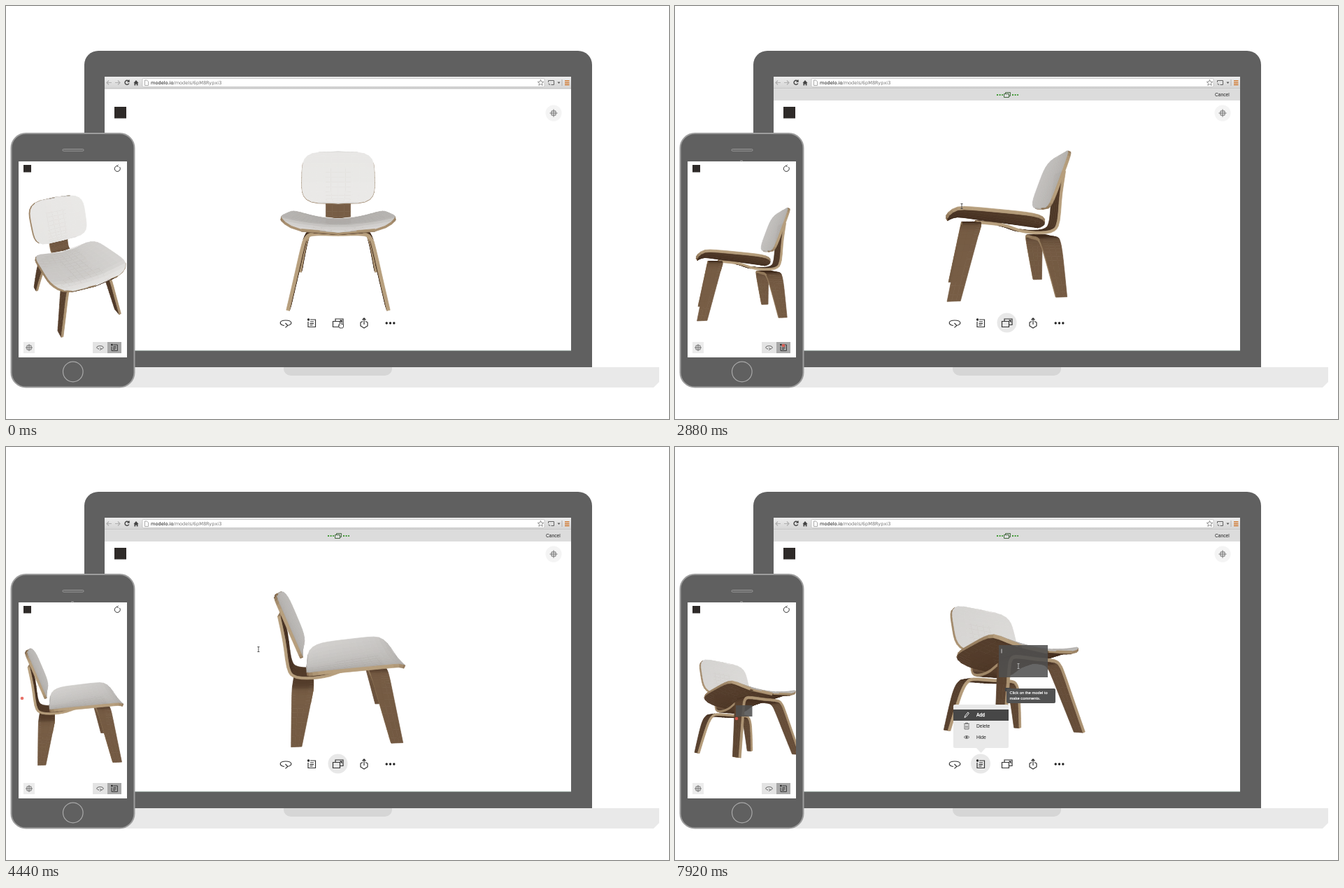
An HTML page with a canvas for the animation above (8 s loop, 948 by 590 pixels).

```html
<!DOCTYPE html>
<html lang="en">
<head>
<meta charset="utf-8">
<title>Chair viewer on laptop and phone</title>
<style>
  html, body { margin: 0; width: 100%; height: 100%; overflow: hidden; background: #fff; }
  svg, canvas { position: absolute; left: 0; top: 0; width: 948px; height: 590px; }
  text { font-family: "Liberation Sans", Arial, sans-serif; font-size: 6.7px; }
  .url { font-family: "DejaVu Sans", sans-serif; font-size: 6.6px; fill: #777; }
  .line { fill: none; stroke: #333; stroke-width: 1.2; }
  .thin { fill: none; stroke: #666; stroke-width: .9; }
</style>
</head>
<body>
<svg viewBox="0 0 948 590">
  <defs>
    <linearGradient id="chrome" x2="0" y2="1">
      <stop stop-color="#ededed"/><stop offset="1" stop-color="#d4d4d4"/>
    </linearGradient>
  </defs>
  <path d="M100 516H934V537L926 545H100Z" fill="#e9e9e9"/>
  <path d="M112 516V84a20 20 0 0 1 20-20H818a20 20 0 0 1 20 20V516Z" fill="#606060"/>
  <path d="M397 516H552V518a10 10 0 0 1-10 10H407a10 10 0 0 1-10-10Z" fill="#d6d6d6"/>
  <path d="M141 101H808V492H141Z" fill="#fff"/>
  <path d="M141 492.3H808" stroke="#b3c4bb" stroke-width=".8"/>
  <path d="M141 101H808V118H141Z" fill="url(#chrome)"/>
  <path d="M141 118H808" stroke="#b4b4b4" stroke-width=".8"/>
  <rect x="195" y="103.500" width="575" height="12" rx="1.500" fill="#fff" stroke="#b9b9b9" stroke-width=".7"/>
  <g fill="none" stroke="#b0b0b0" stroke-width="1.200">
    <path d="M151 109.500h-7m3-3l-3 3l3 3M156 109.500h7m-3-3l3 3l-3 3"/>
    <path d="M175.500 107.500a3 3 0 1 0 .3 3M176 105.500v2.600h-2.600" stroke="#444" stroke-width="1.400"/>
    <path d="M198.500 106h3l2 2v5.500h-5Z" stroke="#888" stroke-width=".7"/>
    <path d="M764.500 105.400l1.200 2.800l3 .2l-2.300 2l.8 3l-2.700-1.700l-2.700 1.700l.8-3l-2.300-2l3-.2Z" stroke="#777" stroke-width=".8"/>
    <path d="M775.500 109v-2.500h8v6h-4M775.500 111a2 2 0 0 1 2 2" stroke="#555" stroke-width=".9"/>
    <path d="M795 105v9" stroke="#999" stroke-width=".7"/>
    <path d="M799 107h6.500m-6.500 2.700h6.500m-6.500 2.700h6.500" stroke="#d0752a" stroke-width="1.500"/>
  </g>
  <path d="M182.500 110l3.500-4l3.500 4h-1v3.500h-1.700v-2h-1.600v2h-1.700v-3.500Z" fill="#444"/>
  <path d="M788.500 108.500h4l-2 2.500Z" fill="#555"/>
  <text class="url" x="207" y="112"><tspan fill="#111">modelo.io</tspan>/models/6pM8Rypxi3</text>
  <rect x="155" y="144" width="17" height="16.500" fill="#2e2a28"/>
  <circle cx="783" cy="153" r="11.500" fill="#f4f4f4"/>
  <path class="thin" d="M777.500 153h11M783 147.500v11M780 150h6v6h-6Z"/>
  <g id="bar">
    <path d="M141 118.500H808V135H141Z" fill="#dcdcdc"/>
    <path d="M460 127h9M482 127h9" stroke="#3f9a34" stroke-width="2" stroke-dasharray="2 1.600"/>
    <path class="thin" d="M470.500 125.500h7v5h-7ZM472.500 125.500v-2h7v5h-2" style="stroke:#355c30"/>
    <text x="772" y="129.200" fill="#222">Cancel</text>
  </g>
  <rect x="7.500" y="182" width="176" height="362.500" rx="21" fill="#606060" stroke="#9d9d9d" stroke-width="2"/>
  <rect x="81" y="204.500" width="30" height="2.600" rx="1.300" fill="none" stroke="#a2a2a2" stroke-width=".9"/>
  <circle cx="95.800" cy="522.500" r="14.300" fill="none" stroke="#aaa" stroke-width="1.200"/>
  <path d="M18 222H173V502H18Z" fill="#fff"/>
  <path id="notch" d="M93 220.500a2 2 0 0 0 4 0Z" fill="#999"/>
</svg>
<canvas id="stage"></canvas>
<svg viewBox="0 0 948 590">
  <rect x="25" y="227" width="11" height="10.500" fill="#2e2a28"/>
  <path class="line" d="M162.500 230a4 4 0 1 1-3-1.600m1.200-1.500l-1.600 1.500l1.600 1.600" style="stroke-width:1"/>
  <path d="M25 480h16v16h-16Z" fill="#ececec"/>
  <path d="M124 480h21v16h-21Z" fill="#e3e3e3"/>
  <path d="M145 480h20v16h-20Z" fill="#a8a8a8"/>
  <path class="thin" d="M28 488h10M33 483v10M30 485h6v6h-6Z"/>
  <use href="#orbit" transform="translate(134.500 488) scale(.6)"/>
  <use href="#note" transform="translate(155 488) scale(.8)"/>

  <circle id="hover" cy="452.500" r="14" fill="#e8e8e8"/>
  <g transform="translate(400 453)"><g id="orbit">
    <path class="line" d="M-2 3.500C-10 2.500-10-4 0-4S10 2.500 2.500 3.500M-.5 0l3.300 3.400l-3.300 3"/>
  </g></g>
  <g transform="translate(437 453)"><g id="note">
    <path class="line" d="M-2-5h7.500v10.500h-10.500v-7.500M-2-2h5M-2.500 .6h5.500M-2.500 3h4"/>
    <circle cx="-4.500" cy="-5" r="1.700" fill="#222"/>
  </g></g>
  <g transform="translate(475 453)">
    <path class="line" d="M-7.500-2.500h10v8h-10ZM-4-2.500v-3.500h11v8.500h-4.500"/>
    <path d="M2-4.500h3.500v4Z" fill="#222"/>
  </g>
  <g transform="translate(512 453)">
    <path class="line" d="M-2-2.500l-3 1.500v5l5 3l5-3v-5l-3-1.500M0 2v-9M-2.500-4.500l2.500-2.700l2.500 2.700"/>
  </g>
  <path d="M544.200 453h.01M549.500 453h.01M554.800 453h.01" stroke="#222" stroke-width="3.400" stroke-linecap="round"/>

  <g id="menu">
    <path d="M400 368H475a2 2 0 0 1 2 2V428a2 2 0 0 1-2 2H444L437.500 437L431 430H400a2 2 0 0 1-2-2V370a2 2 0 0 1 2-2Z" fill="#e9e9e9"/>
    <path id="row" d="M398 375h79v16h-79Z" fill="#474747"/>
    <g id="add" stroke-width=".3">
      <path d="M414 386.500l.8-2.500l4-5l1.600 1.300l-4 5Z" fill="none" stroke="currentColor" stroke-width=".9"/>
      <text x="431" y="385.200" fill="currentColor" stroke="currentColor">Add</text>
    </g>
    <path class="thin" d="M413 395.500h8M415.500 395.500v-1.300h3v1.300M414 396.500v6.500h6v-6.500M416 398v3.500M418 398v3.500"/>
    <path class="thin" d="M413 414.500q4-4 8 0q-4 4-8 0Z"/>
    <circle cx="417" cy="414.500" r="1.300" fill="#444"/>
    <text x="431" y="401.200" fill="#222">Delete</text>
    <text x="431" y="417.200" fill="#222">Hide</text>
  </g>
  <g id="tip">
    <path d="M-2 4v-5h8v5Z" fill="#444"/>
    <rect width="70" height="21" rx="2" fill="#525252"/>
    <text x="4.500" y="8.200" fill="#fff" stroke="#fff" stroke-width=".15" style="font-size:5.800px">Click on the model to<tspan x="4.500" dy="7.700">make comments.</tspan></text>
  </g>
  <circle id="dot" r="2.300" fill="#e4584f" opacity=".85"/>
  <g id="comment">
    <path d="M463 283h70v46h-70ZM87 369h23.500v16h-23.500Z" fill="#505050" opacity=".87"/>
    <path d="M467 288.500v6" stroke="#eee" stroke-width=".8"/>
  </g>
  <path id="phonePointer" d="M93 344v7l1.600-1.500l1.200 2.600l1-.5l-1.200-2.500h2.200Z" fill="#222"/>
  <g id="cursor">
    <path id="arrow" d="M-1-4v8l1.900-1.700l1.300 3l1.300-.6l-1.300-2.900h2.600Z" fill="#222" stroke="#fff" stroke-width=".4"/>
    <path id="beam" d="M-1.500-3.500h3M0-3.500v7M-1.500 3.500h3" fill="none" stroke="#444" stroke-width=".9"/>
    <path id="hand" d="M-2 5l-2-4l1-.7l1 1.200v-5.500q1-1 2 0v3l3.500 1v3l-1 2Z" fill="#fff" stroke="#333" stroke-width=".9"/>
  </g>
</svg>
<script>
const LOOP = 8000, STEP = 120, EYE = 480;
const $ = id => document.getElementById(id);
const show = (id, on) => { $(id).style.display = on ? '' : 'none'; };
const place = (id, x, y) => $(id).setAttribute('transform', `translate(${x} ${y})`);

// Vector helpers
const sub = (a, b) => a.map((v, i) => v - b[i]);
const dot = (a, b) => a[0] * b[0] + a[1] * b[1] + a[2] * b[2];
const cross = (a, b) => [a[1] * b[2] - a[2] * b[1], a[2] * b[0] - a[0] * b[2], a[0] * b[1] - a[1] * b[0]];
const unit = a => { const l = Math.hypot(...a) || 1; return a.map(v => v / l); };
const mix = (a, b, k) => a + (b - a) * k;

// Smooth curve through points, t from 0 to 1
function curve(pts, t) {
  const n = pts.length - 1, i = Math.min(n - 1, Math.floor(t * n)), k = t * n - i;
  const [a, b, c, d] = [-1, 0, 1, 2].map(o => pts[Math.max(0, Math.min(n, i + o))]);
  return b.map((p, j) => p + k / 2 * (c[j] - a[j]
    + k * (2 * a[j] - 5 * p + 4 * c[j] - d[j] + k * (3 * (p - c[j]) + d[j] - a[j]))));
}

// Chair: x to the side, y up, z to the front
const faces = [];

// Bends a grid over u, v in -1..1 into a plate with a visible rim
function sheet(point, nu, nv, thick, top, under) {
  const front = [], back = [], e = .01;
  for (let j = 0; j <= nv; j++) for (let i = 0; i <= nu; i++) {
    const u = -1 + 2 * i / nu, v = -1 + 2 * j / nv, a = u * .96, b = v * .96;
    const p = point(u, v);
    const n = unit(cross(sub(point(a + e, b), point(a - e, b)), sub(point(a, b + e), point(a, b - e))));
    front.push(p);
    back.push(p.map((c, k) => c - thick * n[k]));
  }
  const at = (i, j) => j * (nu + 1) + i;
  for (let j = 0; j < nv; j++) for (let i = 0; i < nu; i++) {
    const q = [at(i, j), at(i + 1, j), at(i + 1, j + 1), at(i, j + 1)];
    faces.push({ pts: q.map(k => front[k]), tone: top });
    faces.push({ pts: q.map(k => back[k]).reverse(), tone: under });
  }
  const rim = (a, b) => faces.push({ pts: [front[a], back[a], back[b], front[b]], tone: 'rim' });
  for (let i = 0; i < nu; i++) {
    rim(at(i, 0), at(i + 1, 0));
    rim(at(i + 1, nv), at(i, nv));
  }
  for (let j = 0; j < nv; j++) {
    rim(at(nu, j), at(nu, j + 1));
    rim(at(0, j + 1), at(0, j));
  }
}

const bow = s => Math.sin(s * Math.PI / 2);
const round = (v, n) => Math.max(0, 1 - Math.abs(v) ** n) ** (1 / n);

function backrest(u, s) {
  const v = bow(s), x = 57 * u * round(v, 4.2);
  return [x, 55.5 + 39.5 * v, -65 - 15 * v + 5 * (x / 57) ** 2];
}

function seat(u, s) {
  const v = bow(s), x = (70 - 3 * v) * u * round(v, 5), q = (1 + v) / 2;
  const lip = 8 * Math.max(0, 1 - q / .16) ** 2;
  return [x, 10 - 18 * q - lip + (8 + 8 * q) * (x / 70) ** 2, 20.5 - 65.5 * v];
}

const SPINE = [[-80, 68], [-75, 35], [-71, -4], [-62, -17], [-40, -20], [-15, -17], [10, -9], [45, -5]];
function spine(u, v) {
  const [z, y] = curve(SPINE, (v + 1) / 2);
  return [20 * u, y, z];
}

// Bent strip: half profile from the middle to the foot, [centre, half width] in depth
const arch = (half, mid, foot) => (u, v) => {
  const [x, y] = curve(half, Math.abs(u)), top = half[0][1], k = (top - y) / (top + 98);
  return [x * Math.sign(u), y, mix(mid[0], foot[0], k) - v * mix(mid[1], foot[1], k)];
};

sheet(backrest, 10, 16, 3.5, 'white', 'wood');
sheet(seat, 12, 18, 4, 'white', 'wood');
sheet(spine, 4, 22, 3.5, 'wood', 'wood');
sheet(arch([[0, -4], [32, -4], [42, -10], [47, -24], [55, -58], [64.5, -98]], [52, 12], [75.5, 8]), 40, 3, 4, 'wood', 'wood');
sheet(arch([[0, -24], [34, -24], [45, -29], [52, -42], [58, -66], [64.5, -98]], [-50, 14], [-60, 7]), 40, 3, 4, 'wood', 'wood');

const TONES = {
  white: [[172, 169, 166], [236, 235, 233]],
  wood: [[62, 41, 27], [119, 93, 69]],
  rim: [[136, 110, 81], [184, 160, 126]]
};

const canvas = $('stage'), ctx = canvas.getContext('2d');
const dpr = Math.min(2, window.devicePixelRatio || 1);
canvas.width = 948 * dpr;
canvas.height = 590 * dpr;
ctx.scale(dpr, dpr);
ctx.lineJoin = 'round';

function drawChair(yaw, pitch, cx, cy, zoom) {
  const a = yaw * Math.PI / 180, b = pitch * Math.PI / 180;
  const ca = Math.cos(a), sa = Math.sin(a), cb = Math.cos(b), sb = Math.sin(b);
  const turn = ([x, y, z]) => {
    const d = z * ca - x * sa;
    return [x * ca + z * sa, y * cb - d * sb, d * cb + y * sb];
  };
  const seen = [];
  for (const { pts, tone } of faces) {
    const p = pts.map(turn);
    const n = unit(cross(sub(p[2], p[0]), sub(p[3], p[1])));
    const mid = [0, 1, 2].map(i => (p[0][i] + p[1][i] + p[2][i] + p[3][i]) / 4);
    const eye = sub([0, 0, EYE], mid), facing = dot(n, unit(eye));
    if (facing > 0) seen.push({ p, tone, facing, far: Math.hypot(...eye) });
  }
  seen.sort((m, n) => n.far - m.far);
  ctx.lineWidth = .7;
  for (const { p, tone, facing } of seen) {
    const [dark, light] = TONES[tone];
    ctx.fillStyle = ctx.strokeStyle = `rgb(${dark.map((c, i) => Math.round(mix(c, light[i], facing)))})`;
    ctx.beginPath();
    for (const [x, y, z] of p) {
      const s = zoom * EYE / (EYE - z);
      ctx.lineTo(cx + x * s, cy - y * s);
    }
    ctx.closePath();
    ctx.fill();
    ctx.stroke();
  }
}

// Keys: time, values...
const VIEW = [[1320, 0, 11.3], [2280, -51, 25], [2880, -81, .5], [3960, -168, 30], [4440, -266, 18], [5640, -325, -8.5]];
const DOT = [[2280, 66, 371], [2880, 155, 485], [3960, 130, 377], [4440, 23, 359], [5640, 83, 427], [6600, 83, 427], [7200, 88, 388]];
const MOUSE = [
  [360, 479, 455, 'hand'], [840, 540, 300, 'arrow'], [1440, 540, 300, 'beam'], [2280, 432, 312, 'beam'],
  [2880, 410, 286, 'beam'], [3960, 523, 327, 'arrow'], [4440, 361, 289, 'beam'], [5640, 444, 440, 'arrow'],
  [6000, 437, 450, 'arrow'], [6480, 437, 384, 'arrow'], [6840, 500, 330, 'arrow'], [7200, 466, 342, 'arrow'],
  [7440, 466, 342, 'beam'], [7920, 491, 313, 'beam']
];

function sample(keys, t) {
  const i = keys.findIndex(k => k[0] > t);
  if (i === 0) return keys[0].slice(1);
  if (i < 0) return keys[keys.length - 1].slice(1);
  const a = keys[i - 1], b = keys[i], k = (t - a[0]) / (b[0] - a[0]);
  return [mix(a[1], b[1], k), mix(a[2], b[2], k), a[3]];
}

function draw(t) {
  const view = sample(VIEW, t);
  ctx.clearRect(0, 0, 948, 590);
  drawChair(view[0], view[1], 475, 305, 1);
  ctx.save();
  ctx.beginPath();
  ctx.rect(18, 222, 155, 280);
  ctx.clip();
  const own = t < 2280 ? [26, 35] : view;
  drawChair(own[0], own[1], 96, 362, .75);
  ctx.restore();

  show('bar', t >= 1080);
  show('notch', t >= 1200);
  show('phonePointer', t >= 1200 && t < 2400);
  show('hover', t >= 120);
  $('hover').setAttribute('cx', t < 6000 ? 474.5 : 437);

  show('menu', t >= 6120);
  show('row', t >= 6480);
  $('add').style.color = t >= 6480 ? '#fff' : '#222';
  show('comment', t >= 7320);

  const [x, y, kind] = sample(MOUSE, t);
  place('cursor', x, y);
  for (const k of ['arrow', 'beam', 'hand']) show(k, k === kind);
  $('beam').style.stroke = t >= 7440 ? '#bbb' : '#444';
  const tip = t < 7320 ? [x, y] : [466, 342];
  show('tip', t >= 6600);
  place('tip', tip[0] + 8, tip[1] + 3);

  show('dot', t >= 2280);
  place('dot', ...sample(DOT, t).slice(0, 2));
}

const start = performance.now();
let last = -1;
function tick() {
  const t = Math.max(0, performance.now() - start) % LOOP, now = Math.floor(t / STEP) * STEP;
  if (now !== last) draw(last = now);
  requestAnimationFrame(tick);
}
tick();
</script>
</body>
</html>
```
